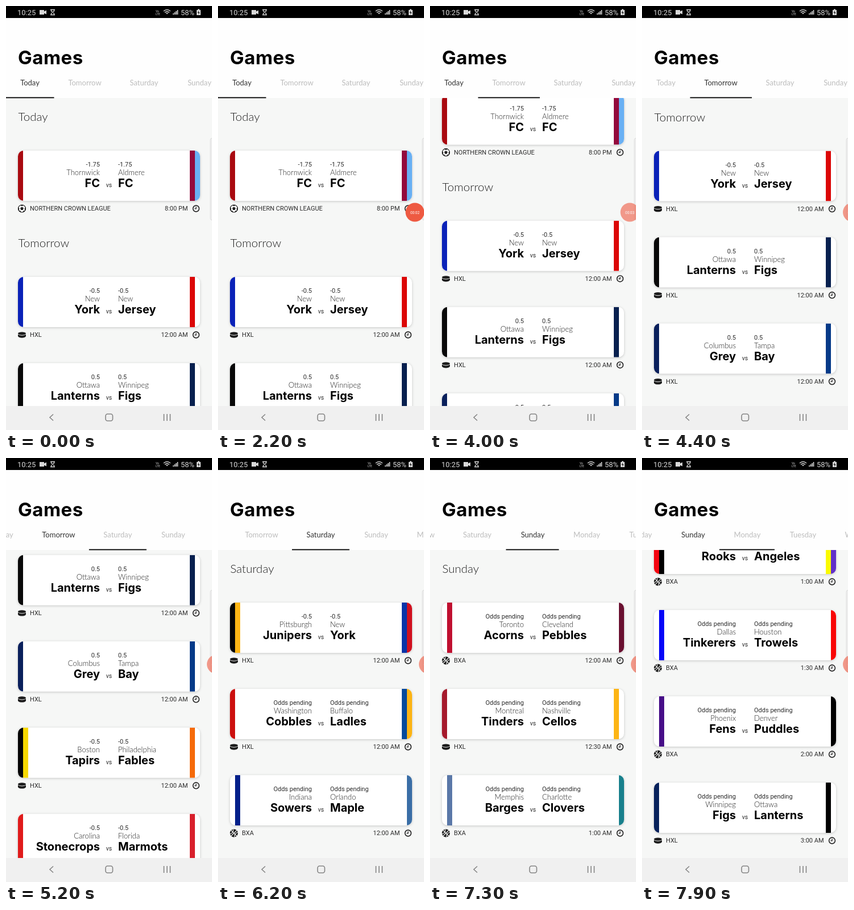
An HTML page for the animation above (8000 ms loop, 362 by 742 pixels).

```html
<!DOCTYPE html>
<html lang="en">
<head>
<meta charset="utf-8">
<title>Games</title>
<style>
  html, body { margin: 0; width: 100%; height: 100%; overflow: hidden; background: #f6f7f6; }
  svg { display: block; width: 100vw; height: 100vh; }
  text { font-family: Roboto, sans-serif; font-size: 11px; fill: #2b2b2b; white-space: pre; }
  .title { font: 700 33px Inter, sans-serif; letter-spacing: .5px; fill: #000; }
  .day { font: 300 20.5px Lato, sans-serif; fill: #222; }
  .tab { font: 400 13px Lato, sans-serif; fill: #bdbdbd; text-anchor: middle; }
  .tab.on { fill: #333; }
  .city { font: 300 13px Lato, sans-serif; fill: #222; }
  .team { font: 700 20px Inter, sans-serif; fill: #000; }
  .vs { font-size: 10.5px; text-anchor: middle; }
  .end { text-anchor: end; }
  .warn { font-size: 6.3px; font-weight: 700; fill: #a01818; text-anchor: middle; }
  .status text { font-size: 13px; fill: #d8d8d8; }
  .paper { fill: #fff; filter: drop-shadow(0 1px 2px rgba(0, 0, 0, .2)); }
  #bubble text { font-size: 6.5px; fill: #fff; text-anchor: middle; }
</style>
</head>
<body>
<svg viewBox="0 0 362 742">
  <defs>
    <clipPath id="round"><rect x="21" width="320" height="88" rx="10"/></clipPath>
    <clipPath id="line2"><rect x="39" y="56" width="126" height="6"/></clipPath>
    <pattern id="hazard" width="6" height="6" patternUnits="userSpaceOnUse" patternTransform="rotate(45)">
      <rect width="6" height="6" fill="#111"/><rect width="3" height="6" fill="#e8cf3a"/>
    </pattern>
    <g id="ball">
      <circle r="6.5" fill="#fff" stroke="#222" stroke-width="1.2"/>
      <path d="M0-3 2.9-.9 1.8 2.5H-1.8L-2.9-.9Z" fill="#222"/>
      <path d="M-2.6-6 0-4.7 2.6-6ZM6.5-2 4.9.7 6 3ZM-6.5-2-4.9.7-6 3ZM1.5 6.4 3 4 5.2 4ZM-1.5 6.4-3 4-5.2 4Z"
        fill="#222" stroke="#222"/>
    </g>
    <g id="puck" fill="#1c1c1c">
      <ellipse cy="-2.4" rx="7" ry="2.6"/>
      <path d="M-7-.8Q0 3.2 7-.8V2.6Q5 5.2 0 5.2T-7 2.6Z"/>
    </g>
    <g id="hoop">
      <circle r="7" fill="#1c1c1c"/>
      <path d="M-5-5 5 5M5-5-5 5M-1.5-7Q.5-1-7 1.5M1.5 7Q-.5 1 7-1.5" fill="none" stroke="#f6f7f6" stroke-width="1.1"/>
    </g>
    <g id="clock" fill="none" stroke="#222" stroke-width="1.6">
      <circle r="5.4"/><path d="M0-3.2V.3H-2.6" stroke-width="1.3"/>
    </g>
  </defs>

  <rect width="362" height="742" fill="#f6f7f6"/>
  <g id="list"></g>

  <rect width="362" height="161" fill="#fefefe"/>
  <text class="title" x="21" y="101.5">Games</text>
  <g id="tabs"></g>

  <g class="status">
    <rect width="362" height="21"/>
    <text x="20" y="15.5">10:25</text>
    <path d="M59 7h8v2.500l4-2v7l-4-2V15h-8Z" fill="#d8d8d8"/>
    <path d="M78 6.500h8M78 15.500h8M79.500 7v2l5 4v2M84.500 7v2l-5 4v2" fill="none" stroke="#d8d8d8" stroke-width="1.300"/>
    <text x="263" y="10.500" style="font-size:5px">Vo</text>
    <text x="263" y="15.500" style="font-size:5px">LTE</text>
    <path d="M277 9q6-5 12 0M279 11.500q4-3.500 8 0M281.500 13.500q1.500-1.500 3 0" fill="none" stroke="#d8d8d8" stroke-width="1.400"/>
    <path d="M294 15v-2M296.500 15v-4M299 15v-6M301.500 15V7" stroke="#d8d8d8" stroke-width="1.700"/>
    <text x="307" y="15.500">58%</text>
    <path d="M335 7h2V5.500h3V7h2v9h-7Z" fill="#d8d8d8"/>
    <path d="M339 8l-2.500 4h2l-.5 3 2.500-4h-2Z" fill="#000"/>
  </g>

  <rect y="700" width="362" height="42" fill="#f0f0f0"/>
  <g fill="none" stroke="#858585" stroke-width="1.600">
    <path d="M83 714.500 77 720l6 5.500"/>
    <rect x="175" y="714" width="12.500" height="12" rx="3.500"/>
    <path d="M277.500 714v12M283 714v12M288.500 714v12"/>
  </g>
  <path d="M362 231.500h-1q-2 0-2 3v137q0 3 2 3h1" fill="#eee" stroke="#d9d9d9" stroke-width=".8"/>
  <g id="bubble">
    <circle r="16.500" fill="#ee5a42"/><text y="2.500"></text>
  </g>
</svg>
<script>
const LOOP = 8000, STEP = 100, GAP = 151, SECTION = 221;
const WAIT = 'Odds pending', HOCKEY = 'HXL', HOOPS = 'BXA', SOCCER = 'NORTHERN CROWN LEAGUE';
const ICON = { [HOCKEY]: 'puck', [HOOPS]: 'hoop', [SOCCER]: 'ball' };

// odds, home city, home team, away city, away team, league, time, four stripe colours
const DAYS = {
  Today: [
    ['-1.75', 'Thornwick', 'FC', 'Aldmere', 'FC', SOCCER, '8:00 PM', '#a90a10 - #930a3c #69b0f4']
  ],
  Tomorrow: [
    ['-0.5', 'New', 'York', 'New', 'Jersey', HOCKEY, '12:00 AM', '#0a22b8 - #dc0707 -'],
    ['0.5', 'Ottawa', 'Lanterns', 'Winnipeg', 'Figs', HOCKEY, '12:00 AM', '#090909 - #08204f -'],
    ['0.5', 'Columbus', 'Grey', 'Tampa', 'Bay', HOCKEY, '12:00 AM', '#0a205c - #063a88 -'],
    ['-0.5', 'Boston', 'Tapirs', 'Philadelphia', 'Fables', HOCKEY, '12:00 AM', '#050505 #f6d800 #f56a0a -'],
    ['-0.5', 'Carolina', 'Stonecrops', 'Florida', 'Marmots', HOCKEY, '12:00 AM', '#e01b1b - #d8202c -']
  ],
  Saturday: [
    ['-0.5', 'Pittsburgh', 'Junipers', 'New', 'York', HOCKEY, '12:00 AM', '#050505 #fdb515 #0a34a8 #d0101f'],
    [WAIT, 'Washington', 'Cobbles', 'Buffalo', 'Ladles', HOCKEY, '12:00 AM', '#cc100e - #04499b #fcb414'],
    [WAIT, 'Indiana', 'Sowers', 'Orlando', 'Maple', HOOPS, '12:00 AM', '- #03208a - #3a6ea6'],
    ['-0.5', 'Minnesota', 'Tarn', 'San', 'Jose', HOCKEY, '1:00 AM', '#154734 #ddcb9f #00727c -'],
    [WAIT, 'Milwaukee', 'Newts', 'Washington', 'Weavers', HOOPS, '1:00 AM', '- #2f6510 - #f94a50'],
    [WAIT, 'Minnesota', 'Bramblefox/es', 'Atlanta', 'Moths', HOOPS, '1:00 AM', '- #000 - #fa0808'],
    ['-0.5', 'Chicago', 'Brownstoat', 'Detroit', 'Tan', HOCKEY, '1:00 AM', '#fb0408 - #bb070b -']
  ],
  Sunday: [
    [WAIT, 'Toronto', 'Acorns', 'Cleveland', 'Pebbles', HOOPS, '12:00 AM', '- #c01030 - #6a1030'],
    [WAIT, 'Montreal', 'Tinders', 'Nashville', 'Cellos', HOCKEY, '12:30 AM', '#a51a2c - #fdb515 -'],
    [WAIT, 'Memphis', 'Barges', 'Charlotte', 'Clovers', HOOPS, '1:00 AM', '- #5a78a8 - #18808c'],
    [WAIT, 'Chicago', 'Rooks', 'Los', 'Angeles', HOOPS, '1:00 AM', '#f40610 #000 #fafa00 #6230c8'],
    [WAIT, 'Dallas', 'Tinkerers', 'Houston', 'Trowels', HOOPS, '1:30 AM', '- #0606f8 - #f90606'],
    [WAIT, 'Phoenix', 'Fens', 'Denver', 'Puddles', HOOPS, '2:00 AM', '- #470f88 - #000'],
    [WAIT, 'Winnipeg', 'Figs', 'Ottawa', 'Lanterns', HOCKEY, '3:00 AM', '#08225c - #000 -']
  ]
};

// label, centre, left edge, right edge, resting strip offset
const TABS = [
  ['Today', 42, 0, 84.5, 0], ['Tomorrow', 138.5, 84.5, 193, 0], ['Saturday', 242.5, 192, 293, 62],
  ['Sunday', 340, 293, 386, 159.5], ['Monday', 435, 386, 483, 254], ['Tuesday', 533, 483, 583, 0],
  ['Wednesday', 640, 583, 697, 0]
];
// when the tab strip and the list start to move
const TAPS = [[3800, 3840], [5066, 5083], [6377, 6420.7], [7677, 7716.6]];

const $ = s => document.querySelector(s);
const text = (x, y, str, cls = '') => `<text x="${x}" y="${y}" class="${cls}">${str}</text>`;
const use = (id, x, y) => `<use href="#${id}" x="${x}" y="${y}"/>`;

function overflow(rest) {
  return `<g clip-path="url(#line2)">${text(39, 69, rest, 'team')}</g>
    <rect x="39" y="61" width="126" height="8" fill="url(#hazard)"/>
    <rect x="44" y="61" width="116" height="8" fill="#fff"/>` +
    text(102, 67.3, 'BOTTOM OVERFLOWED BY 6.0 PIXELS', 'warn');
}

function card([odds, city, team, city2, team2, league, time, colours], y) {
  const [first, rest] = team.split('/');
  const up = rest ? 17 : 0;
  const stripes = colours.split(' ').map((c, i) =>
    c === '-' ? '' : `<rect x="${[21, 30, 323, 332][i]}" width="9" height="88" fill="${c}"/>`).join('');
  return `<g transform="translate(0 ${y})">
    <rect class="paper" x="21" width="320" height="88" rx="10"/>
    <g clip-path="url(#round)">${stripes}</g>` +
    text(165, 28 - up, odds, 'end') + text(165, 43 - up, city, 'city end') +
    (rest ? text(39, 47, first, 'team') + overflow(rest) : text(165, 64, first, 'team end')) +
    text(181, 64, 'vs', 'vs') +
    text(197, 28, odds) + text(197, 43, city2, 'city') + text(197, 64, team2, 'team') +
    use(ICON[league], 28, 101.5) + text(42, 105, league) +
    text(319.5, 105, time, 'end') + use('clock', 334, 101.5) + '</g>';
}

const stops = [0];
let markup = '';
for (const [day, games] of Object.entries(DAYS)) {
  const y = stops.at(-1);
  markup += text(21.5, y + 201, day, 'day') + games.map((g, i) => card(g, y + 253 + i * GAP)).join('');
  stops.push(y + SECTION + GAP * (games.length - 1));
}
$('#list').innerHTML = markup;
$('#tabs').innerHTML = TABS.map(t => text(t[1], 139, t[0], 'tab')).join('') +
  '<rect id="bar" y="159.5" height="1.8"/>';
const labels = document.querySelectorAll('.tab');

const clamp = v => Math.min(1, Math.max(0, v));

// the standard CSS "ease" curve
function ease(x) {
  const curve = (s, a, b) => 3 * (1 - s) ** 2 * s * a + 3 * (1 - s) * s * s * b + s ** 3;
  let lo = 0, hi = 1;
  for (let i = 0; i < 24; i++) {
    const mid = (lo + hi) / 2;
    if (curve(mid, .25, .25) < x) lo = mid; else hi = mid;
  }
  return curve(lo, .1, 1);
}
const ramp = (t, start, length) => {
  const x = clamp((t - start) / length);
  return x === 0 || x === 1 ? x : ease(x);
};
// value at t when each tap moves it on to the next stop
const follow = (values, t, which, length) => TAPS.reduce(
  (v, tap, i) => v + (values[i + 1] - values[i]) * ramp(t, tap[which], length), values[0]);
const column = i => TABS.map(t => t[i]);

function draw(t) {
  $('#list').setAttribute('transform', `translate(0 ${-follow(stops, t, 1, 600)})`);
  $('#tabs').setAttribute('transform', `translate(${-follow(column(4), t, 0, 300)} 0)`);
  const left = follow(column(2), t, 0, 130), right = follow(column(3), t, 0, 130);
  $('#bar').setAttribute('x', left);
  $('#bar').setAttribute('width', right - left);
  const active = TAPS.filter(tap => t >= tap[0] + 300).length;
  labels.forEach((l, i) => l.classList.toggle('on', i === active));

  const slide = clamp((t - 3880) / 400);
  const bubble = $('#bubble');
  bubble.setAttribute('transform', `translate(${346 + 23.5 * slide * slide * (3 - 2 * slide)} 361)`);
  bubble.style.opacity = t < 2200 ? 0 : 1 - .4 * clamp((t - 3700) / 300);
  bubble.lastElementChild.textContent = '00:0' + Math.floor(Math.max(0, t - 200) / 1000);
}

const begin = performance.now();
function tick() {
  const t = (performance.now() - begin + 15) % LOOP;
  draw(Math.floor(t / STEP) * STEP);
  requestAnimationFrame(tick);
}
tick();
</script>
</body>
</html>
```
